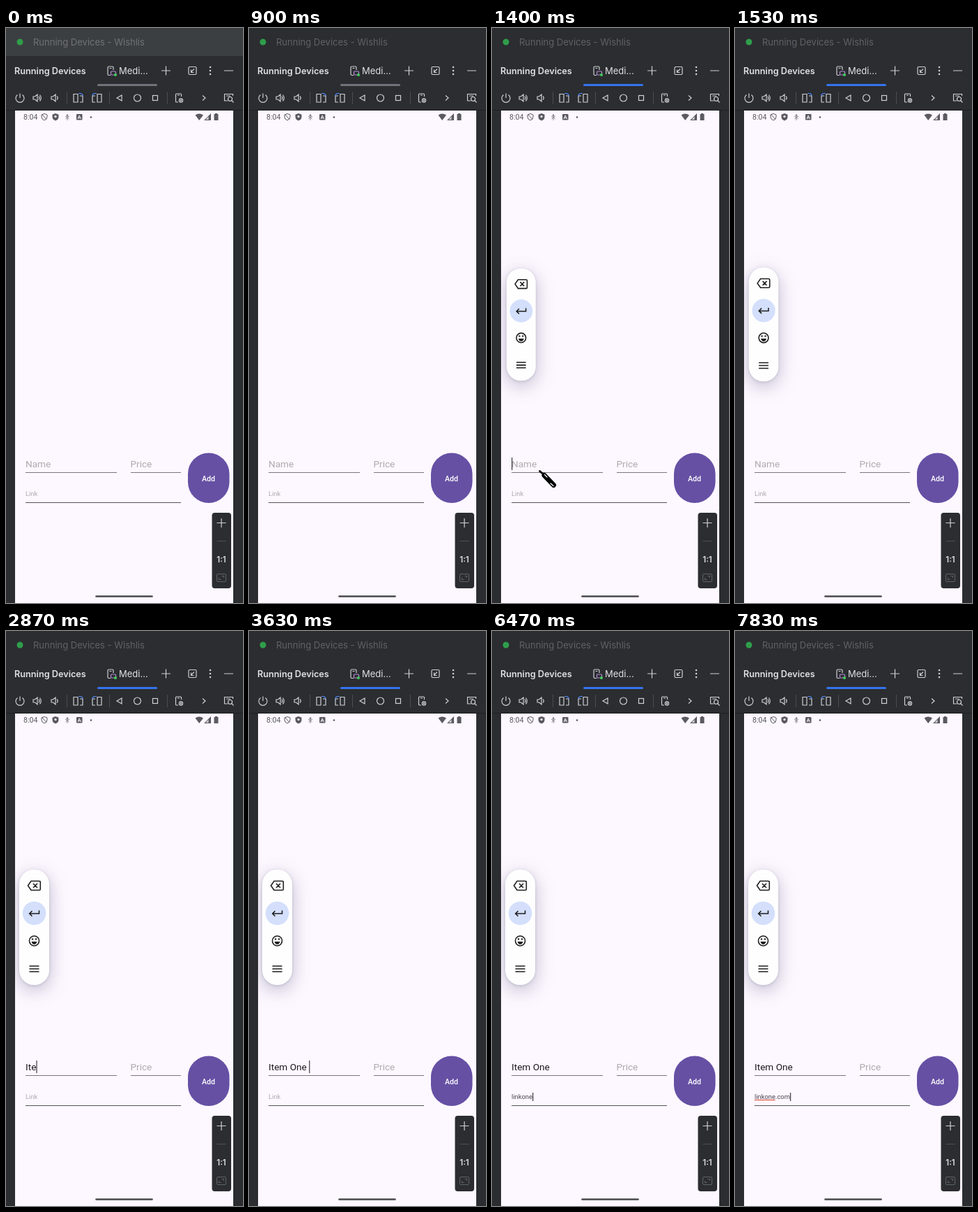
These frames come from a looping animation (340x822 px, 8000 ms). An HTML page:

```html
<!DOCTYPE html>
<html lang="en">
<head>
<meta charset="utf-8">
<title>Running Devices</title>
<style>
  html, body { margin: 0; width: 100%; height: 100%; overflow: hidden; background: #2b2d30; }
  svg { display: block; width: 340px; height: 822px; }
  text { white-space: pre; }
  .ide { font: 13px Inter, sans-serif; fill: #dfe1e5; }
  .field { font: 13.6px Roboto, sans-serif; fill: #1d1b20; }
  .small { font-size: 9.4px; fill: #49454f; }
  .hint { fill: #aeaaae; }
  .line { fill: none; stroke: #ced0d6; stroke-width: 1.2; }
  .status { fill: #5b5a60; }
  .dark { fill: none; stroke: #1f1f1f; stroke-width: 1.6; }
  .rule { stroke: #79767c; }
  .sep { stroke: #4a4c51; }
  #pill { filter: drop-shadow(0 1px 2px rgba(60, 60, 90, .18)) drop-shadow(0 7px 13px rgba(60, 60, 100, .3)); }
</style>
</head>
<body>
<svg viewBox="0 0 340 822" xmlns="http://www.w3.org/2000/svg">
  <defs><clipPath id="screen"><path d="M13 118H326V822H13Z"/></clipPath></defs>

  <!-- window chrome -->
  <rect width="340" height="822" fill="#2b2d30"/>
  <rect id="titleBar" width="340" height="40"/>
  <circle cx="20" cy="20" r="4.5" fill="#2f9e4b"/>
  <text id="title" class="ide" x="39" y="24.5">Running Devices - Wishlis</text>
  <text class="ide" x="12" y="65.5" style="font-size:12.7px;font-weight:600">Running Devices</text>
  <text class="ide" x="162" y="65.5">Medi...</text>
  <rect id="tabLine" x="131" y="80" width="86" height="3" rx="1.5"/>
  <path d="M0 117.5H340" stroke="#1e1f22"/>

  <g class="line">
    <path d="M150 67.500H147.500Q146 67.500 146 66V56.500Q146 55 147.500 55H152.500Q154 55 154 56.500V60M148.500 57.500H151.500"/>
    <rect x="150.500" y="62" width="7" height="5" rx="1" stroke="#b58bd4"/>
    <circle cx="157" cy="67" r="2" fill="#3fd05c" stroke="none"/>
    <path d="M223 61H236M229.500 54.500V67.500M313 61H326"/>
    <rect x="262" y="55.500" width="11" height="11" rx="1.5"/>
    <path d="M270 58.500L265.500 63M265.500 59.500V63.500H269.500"/>
    <g fill="#ced0d6" stroke="none"><circle cx="293" cy="56" r="1.300"/><circle cx="293" cy="61" r="1.300"/><circle cx="293" cy="66" r="1.300"/></g>
  </g>

  <g class="line">
    <path d="M20 93.500V100M16.500 95.500A6 6 0 1 0 23.500 95.500"/>
    <path d="M39 98V102H41.500L45 105V95L41.500 98ZM47 97.500Q49 100 47 102.500M48.500 95.500Q52 100 48.500 104.500"/>
    <path d="M65 98V102H67.500L71 105V95L67.500 98ZM73 97.500Q75.500 100 73 102.500"/>
    <path d="M97 94.500H103V106H97ZM106 97H110V106H106"/>
    <path d="M104 93.500H107Q110 94 110 97" stroke="#548af7"/>
    <path d="M131 94.500H137V106H131ZM128 97H124V106H128"/>
    <path d="M130 93.500H127Q124 94 124 97" stroke="#548af7"/>
    <path d="M166 96V104L159 100Z"/>
    <circle cx="188.500" cy="100" r="5"/>
    <rect x="210.500" y="96.500" width="7" height="7"/>
    <path d="M247 106H244.500Q243.500 106 243.500 105V95Q243.500 94 244.500 94H250.500Q251.500 94 251.500 95V98M246 96H249"/>
    <circle cx="251" cy="103.500" r="2.600"/><circle cx="251" cy="103.500" r=".7"/>
    <path d="M282 96.500L286 100L282 103.500"/>
    <path d="M318 104H313.500V94.500H325.500V97M316 97H322"/>
    <circle cx="321.500" cy="101.500" r="3"/><path d="M323.700 103.700L326.500 106.500"/>
  </g>
  <path class="sep" d="M87.500 91V109M148.500 91V109M231.500 91V109"/>

  <!-- phone screen -->
  <rect x="13" y="118" width="313" height="704" fill="#fdf7ff"/>
  <g class="status">
    <text x="25" y="131" style="font:10.6px Roboto,sans-serif">8:04</text>
    <path d="M55 122.500L59 124V127Q59 130.500 55 132Q51 130.500 51 127V124ZM52 124L58 130.500" fill="none" stroke="#5b5a60"/>
    <path d="M71 122L75.500 123.700V127Q75.500 131 71 132.500Q66.500 131 66.500 127V123.700Z"/><circle cx="71" cy="126.500" r="1.600" fill="#fdf7ff"/>
    <path d="M88 123V132M85 126L88 128L91 126M85.500 130L88 128L90.500 130" fill="none" stroke="#8b898f"/><circle cx="88" cy="125" r="1.500" fill="#8b898f"/>
    <rect x="101" y="123" width="8.500" height="8.500" rx="1"/><path d="M103 130L105.200 125L107.500 130M104 128.500H106.500" fill="none" stroke="#fdf7ff"/>
    <circle cx="122" cy="127.500" r="1.300"/>
    <path d="M271.500 124.500Q277 120.500 283 124.500L277.200 132ZM284 132H294V122Z"/>
    <path d="M286.500 131H290.500V126.500Z" fill="#d6d2da"/>
    <path d="M300 122H303V123H304.500V132H298.500V123H300Z"/>
  </g>
  <path d="M129.500 812.500H209.500" stroke="#4a484d" stroke-width="2.600" stroke-linecap="round"/>

  <!-- form -->
  <path class="rule" d="M28 635.500H159M179 635.500H251"/>
  <path d="M28 678.500H251" stroke="#56535a"/>
  <text id="name" class="field" x="28" y="628"></text>
  <text class="field hint" x="178.500" y="628">Price</text>
  <text id="link" class="field small" x="28" y="669"></text>
  <path id="typo" d="M28 670.500H57.500" stroke="#e0604e" stroke-width="1.300"/>
  <rect id="nameCaret" y="614" width="1.300" height="18" fill="#4a4850"/>
  <rect id="linkCaret" y="660" width="1.300" height="12" fill="#4a4850"/>
  <rect x="261" y="607.500" width="59.500" height="71.500" rx="29.700" fill="#6650a4"/>
  <text x="290.500" y="647.500" text-anchor="middle" fill="#fff" style="font:500 10.6px Roboto,sans-serif">Add</text>

  <!-- floating keyboard bar -->
  <g clip-path="url(#screen)">
    <g id="bar">
      <rect id="pill" x="-21.500" y="-82.500" width="43" height="165" rx="21" fill="#fefeff"/>
      <circle cy="-20" r="16.800" fill="#d3dffb"/>
      <g class="dark">
        <path d="M-4.500 -66H7Q8.800 -66 8.800 -64.500V-54.500Q8.800 -53 7 -53H-4.500L-9 -59.500ZM-1.500 -62.500L4.500 -56.500M4.500 -62.500L-1.500 -56.500"/>
        <path d="M7 -24V-19.500H-6.500M-3 -23.300L-6.800 -19.500L-3 -15.700"/>
        <circle cy="19.500" r="7"/><path d="M-4 20.500H4Q3 24.500 0 24.500T-4 20.500Z" fill="#1f1f1f" stroke="none"/>
        <circle cx="-2.500" cy="17" r=".5"/><circle cx="2.500" cy="17" r=".5"/>
        <path d="M-7 55.500H7M-7 59.500H7M-7 63.500H7"/>
      </g>
    </g>
  </g>
  <g id="pen" stroke-linecap="round" fill="none">
    <path d="M68.500 633.500L75 639" stroke="#000" stroke-width="2.800"/>
    <path d="M75 639.500L88.500 653.500" stroke="#000" stroke-width="7"/>
    <path d="M75.500 638.500L79 642M84 651L88 654.500" stroke="#fff" stroke-width="1.200"/>
  </g>

  <!-- zoom controls -->
  <rect x="295.500" y="693" width="27.500" height="108" rx="4" fill="#2b2d30"/>
  <path class="line" d="M302.500 707.500H315.500M309 701V714"/>
  <path d="M302.500 733.500H315.500" stroke="#4e5157"/>
  <text class="ide" x="309" y="764" text-anchor="middle" style="font-size:11.500px;font-weight:600">1:1</text>
  <g fill="none" stroke="#5f6269">
    <rect x="302.500" y="780.500" width="13" height="11" rx="1.500"/>
    <path d="M305.500 789V786M305.500 788.500H308.500M312.500 783V786M312.500 783.500H309.500"/>
  </g>
</svg>
<script>
const LOOP = 8000;
const FOCUS_WINDOW = 900, FOCUS_TAB = 950, FOCUS_NAME = 1000, FOCUS_LINK = 3930;
const BAR_START = 1070, BAR_FADE = 130, BAR_SETTLE = 160;
const $ = id => document.getElementById(id);

// [time, value] steps, each held until the next
const nameTyped = [[0, ''], [2530, 'I'], [2670, 'It'], [2800, 'Ite'], [2930, 'Item'],
  [3030, 'Item '], [3130, 'Item O'], [3230, 'Item On'], [3350, 'Item One'], [3600, 'Item One ']];
const linkTyped = [[0, ''], [5200, 'l'], [5400, 'li'], [5570, 'lin'], [5630, 'link'],
  [5800, 'linko'], [5900, 'linkon'], [6000, 'linkone'],
  [7480, 'linkone.'], [7580, 'linkone.c'], [7680, 'linkone.co'], [7800, 'linkone.com']];
const nameBlink = [[0, 0], [FOCUS_NAME, 1], [1500, 0], [2000, 1], [FOCUS_LINK, 0]];
const linkBlink = [[0, 0], [FOCUS_LINK, 1], [4430, 0], [4930, 1], [6480, 0], [6980, 1]];

const held = (steps, t) => steps.filter(([at]) => at <= t).pop()[1];
const show = (id, on) => $(id).setAttribute('visibility', on ? 'visible' : 'hidden');
const paint = (id, color) => $(id).setAttribute('fill', color);

function drawField(id, hint, value, caretOn) {
  const text = $(id), caret = $(id + 'Caret');
  const shown = value || hint;
  if (text.textContent !== shown) text.textContent = shown;
  text.classList.toggle('hint', !value);
  caret.setAttribute('x', 28 + (value ? text.getComputedTextLength() : 0));
  show(id + 'Caret', caretOn);
}

// The bar fades in while it eases out towards the screen edge.
function drawBar(t) {
  const age = Math.max(0, t - BAR_START);
  const rest = Math.exp(-age / BAR_SETTLE);
  $('bar').setAttribute('transform',
    `translate(${40.5 + 10.5 * rest} ${423.5 + 3.5 * rest}) scale(${1 - 0.21 * rest})`);
  $('bar').setAttribute('opacity', Math.min(1, age / BAR_FADE));
}

function render(t) {
  const active = t >= FOCUS_WINDOW;
  paint('titleBar', active ? '#2b2d30' : '#3c3f41');
  $('title').style.fill = active ? '#5f6269' : '#6f7277';
  paint('tabLine', t >= FOCUS_TAB ? '#3574f0' : '#6f737a');

  drawField('name', 'Name', held(nameTyped, t), held(nameBlink, t));
  drawField('link', 'Link', held(linkTyped, t), held(linkBlink, t));
  show('typo', t >= 7480);
  show('pen', t >= FOCUS_NAME && t < 1450);
  drawBar(t);
}

const start = performance.now();
function tick() {
  render((performance.now() - start) % LOOP);
  requestAnimationFrame(tick);
}
tick();
</script>
</body>
</html>
```
